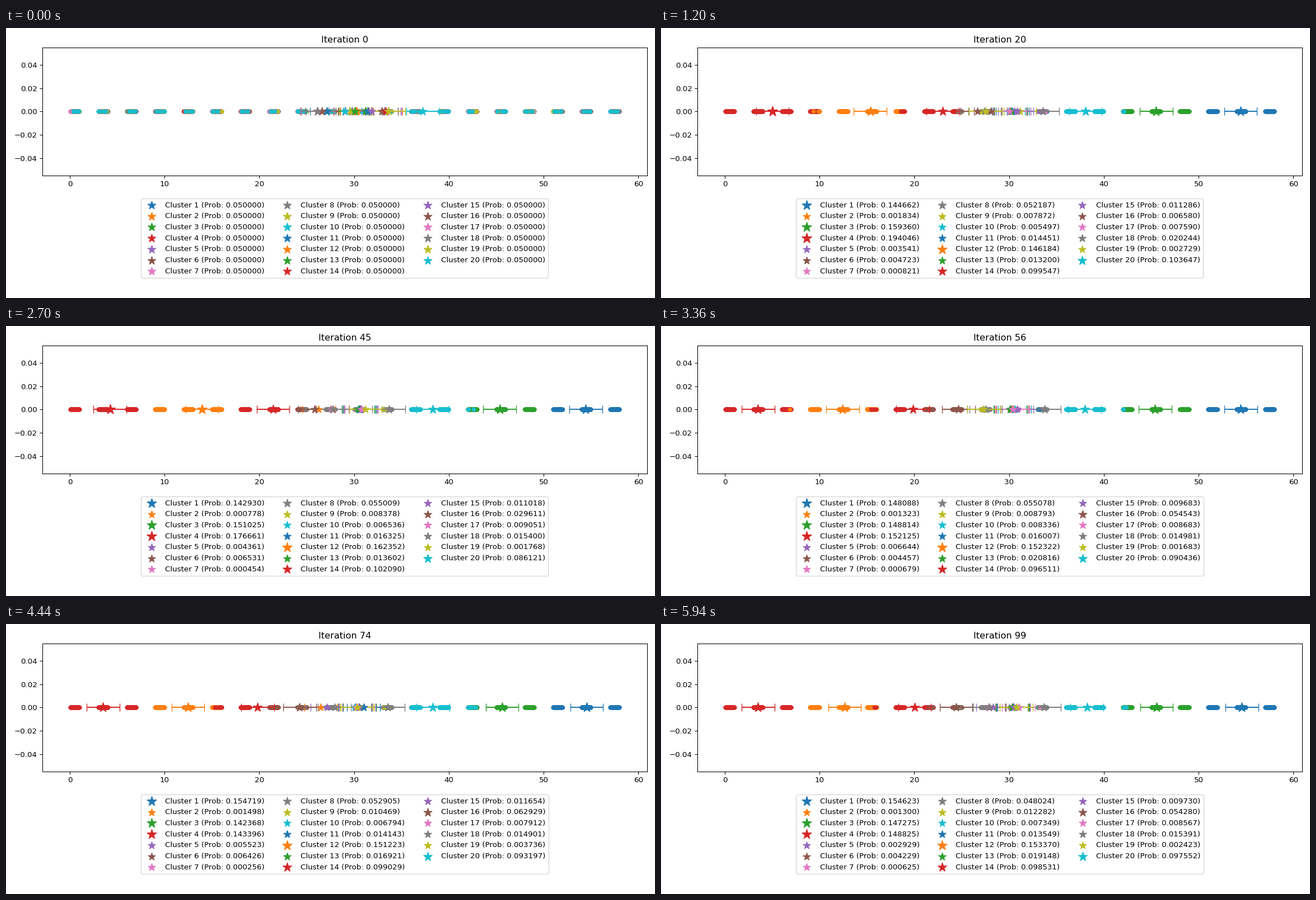
Recreate the animation shown at these times as a matplotlib script. Size 1159 by 483 pixels, loop 6000 ms.

```python
import numpy as np
import matplotlib.pyplot as plt
from matplotlib.animation import FuncAnimation

K, FRAMES, DPI = 20, 100, 96.6
SPREAD = np.sqrt(3)
COLORS = [f"C{k % 10}" for k in range(K)]

# twenty unit-wide blocks of points, three units apart
data = (3 * np.arange(K)[:, None] + np.random.default_rng(4).random((K, 100))).ravel()

# main clusters: first mean, early and late mean, early and late weight
MAIN = {
    1: (27.1, 54.5, 54.5, 0.150, 0.150),
    3: (31.2, 45.5, 45.5, 0.150, 0.150),
    4: (26.1, 5.0, 3.5, 0.199, 0.149),
    8: (29.8, 33.65, 33.65, 0.055, 0.054),
    12: (30.2, 15.5, 12.5, 0.149, 0.148),
    14: (33.3, 22.95, 19.9, 0.099, 0.099),
    16: (26.6, 27.0, 24.4, 0.006, 0.055),
    18: (26.1, 27.5, 27.6, 0.021, 0.013),
    20: (37.25, 38.1, 38.1, 0.094, 0.096),
}
main = np.array(list(MAIN)) - 1
rest = np.setdiff1d(np.arange(K), main)


def build_paths():
    """Arrays of the five MAIN columns for every cluster."""
    rng = np.random.default_rng(11)
    paths = np.empty((5, K))
    paths[:, main] = np.array(list(MAIN.values())).T
    paths[0, rest] = rng.normal(30.2, 2.2, rest.size)
    paths[1:3, rest] = 30.45
    share = rng.dirichlet(np.ones(rest.size))
    for row in paths[3:]:
        row[rest] = share * (1 - row[main].sum())
    return paths


FIRST, X_EARLY, X_LATE, W_EARLY, W_LATE = build_paths()


def mixture(i, rng):
    """Weights and means of the mixture at iteration i."""
    if i == 0:
        return np.full(K, 1 / K), FIRST
    settle = 1 - np.exp(-i / 3)
    shift = 1 / (1 + np.exp(-(i - 45) / 1.5))

    def along(a, b, c):
        return a + (b - a) * settle + (c - b) * shift

    w = along(1 / K, W_EARLY, W_LATE)
    w = rng.dirichlet(4000 * w / w.sum())
    noise = rng.normal(0, 1, K) * SPREAD / np.sqrt(4000 * w + 3)
    # nearly empty clusters hop between two blocks
    wander = np.clip(rng.choice([27.5, 30.5], K) + noise, 26.2, 31.2)
    return w, np.where(w < 0.006, wander, along(FIRST, X_EARLY, X_LATE) + noise)


def assign(i, w, mu, rng):
    """Draw a cluster for every point."""
    if i == 0:
        return rng.integers(0, K, data.size)
    logp = np.log(w + 1e-12) - (data[:, None] - mu) ** 2 / (2 * SPREAD)
    return np.argmax(logp + rng.gumbel(size=logp.shape), axis=1)


def star_size(w):
    return 100 + 500 * w


def label(k, w):
    return f"Cluster {k + 1} (Prob: {w:.6f})"


# the small surplus keeps the pixel size from rounding down
fig, ax = plt.subplots(figsize=(1159.01 / DPI, 483.01 / DPI), dpi=DPI)
ax.set_xlim(-2.9, 60.9)
ax.set_ylim(-0.055, 0.055)
title = ax.set_title("Iteration 0")

dots = [ax.scatter([], [], s=22, color=c) for c in COLORS]
bars = [ax.plot([], [], color=c, marker="|", markersize=10, markeredgewidth=1,
                solid_capstyle="butt", zorder=2)[0] for c in COLORS]
stars = [ax.scatter([FIRST[k]], [0], s=star_size(1 / K), marker="*",
                    color=c, label=label(k, 1 / K), zorder=3)
         for k, c in enumerate(COLORS)]
legend = ax.legend(loc="upper center", bbox_to_anchor=(0.5, -0.15), ncol=3)
fig.tight_layout()


def update(i):
    rng = np.random.default_rng(100 + i)
    w, mu = mixture(i, rng)
    z = assign(i, w, mu, rng)
    title.set_text(f"Iteration {i}")
    for k in range(K):
        x = data[z == k]
        dots[k].set_offsets(np.column_stack([x, np.zeros_like(x)]))
        bars[k].set_data([mu[k] - SPREAD, mu[k] + SPREAD], [0, 0])
        stars[k].set_offsets([[mu[k], 0]])
        for star in (stars[k], legend.legend_handles[k]):
            star.set_sizes([star_size(w[k])])
        legend.get_texts()[k].set_text(label(k, w[k]))
    return []


anim = FuncAnimation(fig, update, frames=FRAMES, interval=60,
                     init_func=lambda: update(0), repeat=True,
                     repeat_delay=0, blit=False)
plt.show()
```
